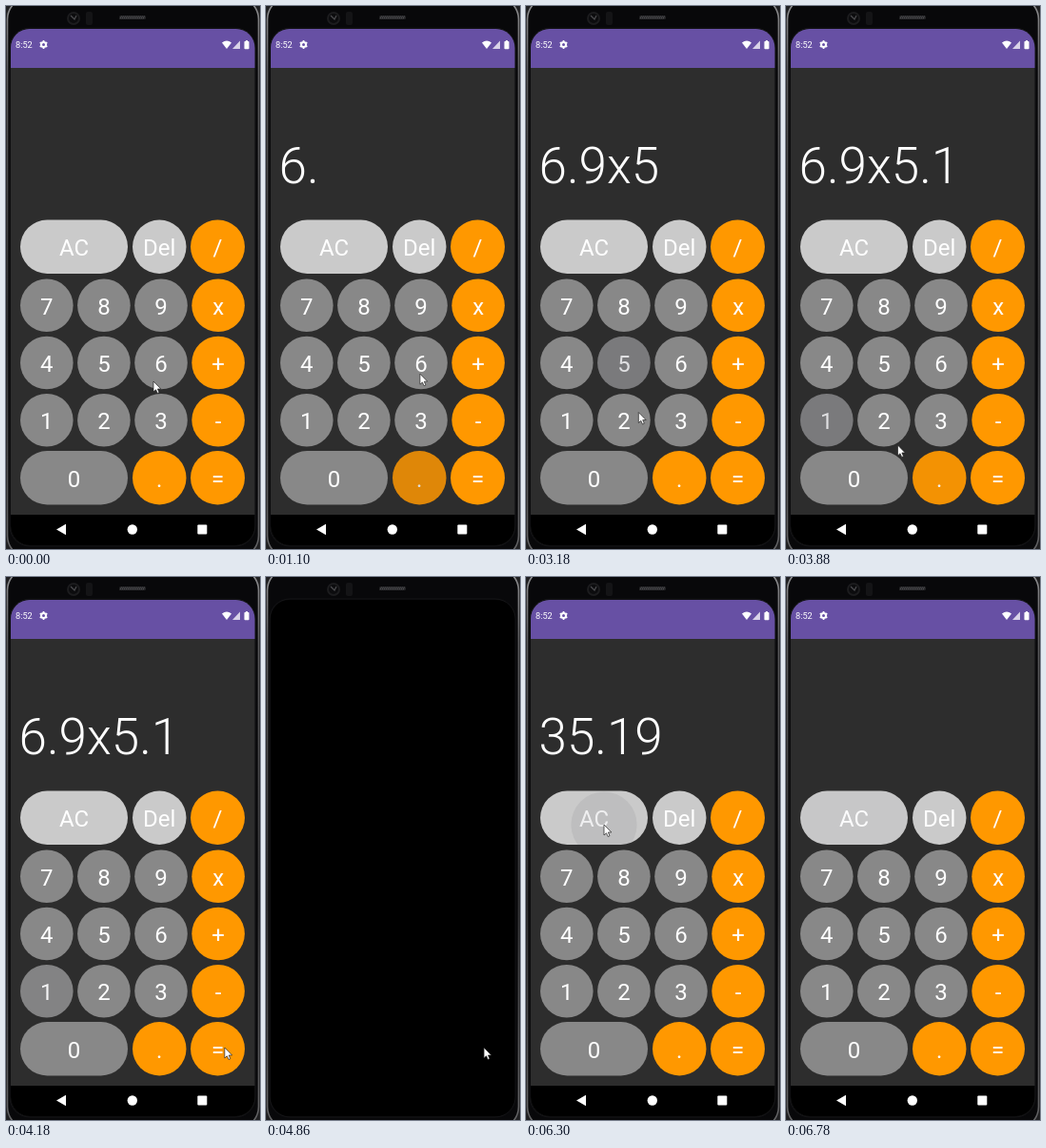
An HTML page with a canvas that plays this animation: 267 px wide and 570 px high, repeating every 6.82 s.

```html
<!DOCTYPE html>
<html lang="en">
<head>
<meta charset="utf-8">
<title>Calculator</title>
<style>
html, body { margin: 0; width: 100%; height: 100%; overflow: hidden; background: #000; }
canvas { display: block; width: 267px; height: 570px; }
</style>
</head>
<body>
<canvas id="stage"></canvas>
<script>
const W = 267, H = 570, LOOP = 6820;
const canvas = document.getElementById('stage');
const ratio = window.devicePixelRatio || 1;
canvas.width = W * ratio;
canvas.height = H * ratio;
const g = canvas.getContext('2d');

const LIGHT = '#cacaca', GREY = '#888888', ORANGE = '#ff9800';
const keys = [
  ['AC', 15, 224.5, 113, LIGHT], ['Del', 133, 224.5, 56.5, LIGHT], ['/', 194, 224.5, 57, ORANGE],
  ['0', 15, 467, 113, GREY], ['.', 133, 467, 56.5, ORANGE], ['=', 194, 467, 57, ORANGE]
];
['789x', '456+', '123-'].forEach((row, r) => {
  [...row].forEach((label, c) => {
    keys.push([label, 15 + c * 60.1, 286.5 + r * 60.2, 55.6, c === 3 ? ORANGE : GREY]);
  });
});

// [time, key, x, y]
const presses = [
  [200, '6', 156, 392], [780, '.', 160, 497], [1280, '9', 163, 322],
  [1790, 'x', 218, 318], [2880, '5', 106, 384], [3320, '.', 157, 494],
  [3620, '1', 46, 440], [4520, '=', 230, 494], [6180, 'AC', 82, 260]
];

const display = [
  [0, ''], [300, '6'], [880, '6.'], [1380, '6.9'], [1890, '6.9x'], [2980, '6.9x5'],
  [3420, '6.9x5.'], [3720, '6.9x5.1'], [4640, '35.19'], [6380, '']
];

const path = [
  [0, 155, 394], [380, 156, 392], [680, 160, 497], [930, 160, 497],
  [1200, 163, 322], [1460, 163, 322], [1700, 218, 318], [1910, 218, 318],
  [2060, 174, 380], [2320, 112, 386], [2640, 106, 384], [3040, 106, 384],
  [3180, 118, 426], [3300, 157, 494], [3440, 157, 494], [3590, 46, 440],
  [3780, 46, 440], [4040, 230, 494], [4940, 229, 494], [5250, 214, 456],
  [5620, 145, 358], [6020, 84, 264], [6180, 82, 260], [6440, 82, 260],
  [6740, 90, 274]
];
const CURSOR_END = 6760;
const BLANK = [4820, 4900];

function box(x, y, w, h, r) {
  g.beginPath();
  g.roundRect(x, y, w, h, r);
}

function poly(points) {
  g.beginPath();
  points.forEach(([x, y]) => g.lineTo(x, y));
  g.closePath();
}

function disc(x, y, r, color) {
  g.beginPath();
  g.arc(x, y, r, 0, Math.PI * 2);
  g.fillStyle = color;
  g.fill();
}

function drawPhone() {
  g.fillStyle = '#202022';
  g.fillRect(0, 0, W, H);
  box(1.5, -9, 264, 588, 23);
  g.fillStyle = '#08080a';
  g.fill();
  const edge = g.createLinearGradient(0, 0, 0, H);
  edge.addColorStop(0, '#8a8a8c');
  edge.addColorStop(0.12, '#59595b');
  edge.addColorStop(0.6, '#303032');
  edge.addColorStop(1, '#626264');
  g.strokeStyle = edge;
  g.lineWidth = 1.6;
  g.stroke();
  box(4, 23, 258, 544, 21);
  g.strokeStyle = '#151517';
  g.lineWidth = 1;
  g.stroke();

  disc(71, 13, 7, '#1c1c1e');
  disc(71, 13, 5, '#0c0c0e');
  g.strokeStyle = '#4c4c4f';
  g.lineWidth = 1.2;
  g.beginPath();
  g.moveTo(68, 10);
  g.lineTo(72, 14);
  g.lineTo(74, 10);
  g.stroke();
  box(84, 6, 7, 14, 2);
  g.fillStyle = '#141416';
  g.fill();
  box(119, 10, 28, 4, 1.5);
  g.fillStyle = '#252527';
  g.fill();
  g.strokeStyle = '#555558';
  g.lineWidth = 0.8;
  g.beginPath();
  for (let x = 120; x < 146; x += 2) {
    g.moveTo(x, 13.5);
    g.lineTo(x + 1.5, 10.5);
  }
  g.stroke();
}

function drawStatus() {
  g.fillStyle = '#6750a4';
  g.fillRect(5, 24, 257, 41);
  g.fillStyle = '#fff';
  g.font = '400 9.2px Roboto, sans-serif';
  g.textAlign = 'left';
  g.fillText('8:52', 10, 44.2);

  g.strokeStyle = '#fff';
  g.lineWidth = 2;
  g.beginPath();
  g.arc(39.5, 40.5, 2.5, 0, Math.PI * 2);
  g.stroke();
  g.lineWidth = 1.7;
  g.beginPath();
  for (let i = 0; i < 6; i++) {
    const a = i * Math.PI / 3 + Math.PI / 6, c = Math.cos(a), s = Math.sin(a);
    g.moveTo(39.5 + c * 3, 40.5 + s * 3);
    g.lineTo(39.5 + c * 4.4, 40.5 + s * 4.4);
  }
  g.stroke();

  g.beginPath();
  g.moveTo(232, 45);
  g.lineTo(227, 38.6);
  g.quadraticCurveTo(232, 34.6, 237, 38.6);
  g.fill();
  poly([[238, 45], [246, 45], [246, 36.5]]);
  g.globalAlpha = 0.75;
  g.fill();
  g.globalAlpha = 1;
  box(250.5, 37, 5, 8.2, 0.8);
  g.fill();
  g.fillRect(252, 36, 2, 1.5);
}

function drawNav() {
  g.fillStyle = '#000';
  g.fillRect(5, 534, 257, 33);
  g.fillStyle = '#fff';
  poly([[53, 549.5], [63, 543.8], [63, 555.2]]);
  g.fill();
  disc(132.8, 549.5, 5.2, '#fff');
  box(201.3, 544.5, 10, 10, 1);
  g.fill();
}

function drawRipple(label, t) {
  for (const [start, key, x, y] of presses) {
    const age = t - start;
    if (key !== label || age < 0 || age > 650) continue;
    const fade = Math.min(1, (650 - age) / 250);
    disc(x, y, 14 + age * 0.17, `rgba(45,45,55,${0.15 * fade * (label === 'AC' ? 0.5 : 1)})`);
  }
}

function drawKey([label, x, y, w, color], t) {
  const h = w > 100 || w > 56 ? 56.5 : 55.6;
  g.save();
  box(x, y, w, h, h / 2);
  g.fillStyle = color;
  g.fill();
  g.clip();
  g.fillStyle = '#fff';
  g.font = '400 24px Roboto, sans-serif';
  g.textAlign = 'center';
  g.fillText(label, x + w / 2, y + h / 2 + 9.6);
  drawRipple(label, t);
  g.restore();
}

function drawScreen(t) {
  g.save();
  box(5, 24, 256.5, 542, 20);
  g.clip();
  if (t >= BLANK[0] && t < BLANK[1]) {
    g.fillStyle = '#000';
    g.fillRect(0, 0, W, H);
  } else {
    g.fillStyle = '#2d2d2d';
    g.fillRect(5, 24, 257, 542);
    drawStatus();
    drawNav();
    const value = display.filter(d => d[0] <= t).pop()[1];
    g.fillStyle = '#fff';
    g.font = '300 53px Roboto, sans-serif';
    g.textAlign = 'left';
    g.fillText(value, 13.5, 185.5);
    keys.forEach(k => drawKey(k, t));
  }
  g.restore();
}

function cursorAt(t) {
  const i = path.findIndex(p => p[0] > t);
  if (i < 0) return path[path.length - 1].slice(1);
  const [t0, x0, y0] = path[i - 1], [t1, x1, y1] = path[i];
  const k = (t - t0) / (t1 - t0);
  return [x0 + (x1 - x0) * k, y0 + (y1 - y0) * k];
}

function drawCursor(t) {
  if (t >= CURSOR_END) return;
  const [x, y] = cursorAt(t);
  g.save();
  g.translate(x, y);
  poly([[0, 0], [0, 11], [2.5, 8.8], [4.2, 12.5], [6, 11.7], [4.4, 8], [7.8, 8]]);
  g.fillStyle = '#fff';
  g.fill();
  g.strokeStyle = '#222';
  g.lineWidth = 0.7;
  g.stroke();
  g.restore();
}

function draw(now) {
  const t = now % LOOP;
  g.setTransform(ratio, 0, 0, ratio, 0, 0);
  drawPhone();
  drawScreen(t);
  drawCursor(t);
}

const begin = performance.now();
function tick() {
  draw(performance.now() - begin);
  requestAnimationFrame(tick);
}
tick();
</script>
</body>
</html>
```
